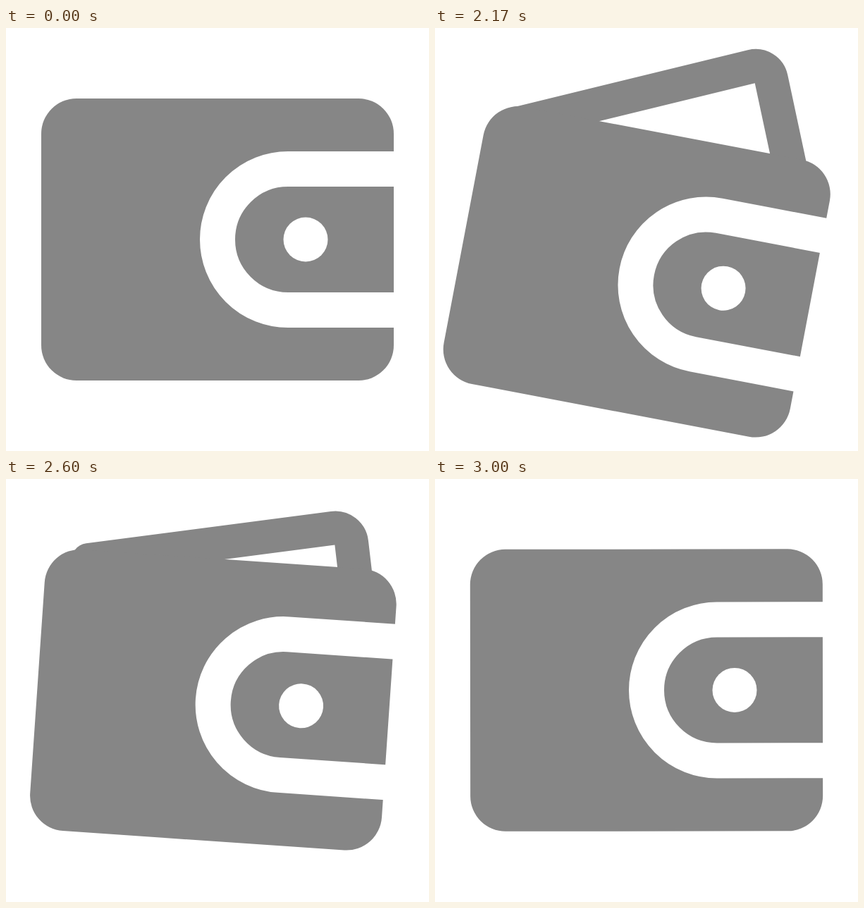
These frames come from a looping animation (600 px wide and 600 px high, 3.02 s). An HTML page:

```html
<!DOCTYPE html>
<html lang="en">
<head>
<meta charset="utf-8">
<title>Wallet</title>
<style>
  html, body { margin: 0; height: 100%; overflow: hidden; background: #fff; }
  svg { display: block; width: 100%; height: 100%; }
</style>
</head>
<body>
<svg viewBox="0 0 600 600">
  <g id="wallet">
    <path id="card" d="M-350 -24H0A24 24 0 0 1 24 0V150" fill="none"
          stroke="#868686" stroke-width="48" stroke-linecap="round"/>
    <rect x="50" y="100" width="500" height="400" rx="50" fill="#868686"/>
    <path d="M600 200H400a100 100 0 0 0 0 200H600" fill="none" stroke="#fff" stroke-width="50"/>
    <circle cx="425" cy="300" r="31.5" fill="#fff"/>
  </g>
</svg>
<script>
const LOOP = 3020, STEP = 25, OPEN = 2000, CLOSE = 2500, SETTLE = 2700;
const TILT = 13.2, FOLD = 30, RECOIL = -4.1;
const card = document.getElementById('card');
const wallet = document.getElementById('wallet');

const progress = (t, start, length) => Math.min(1, Math.max(0, (t - start) / length));
const mix = (a, b, p) => a + (b - a) * p;

function draw(now) {
  const t = Math.floor((now % LOOP + 5) / STEP) * STEP;
  const close = progress(t, CLOSE, SETTLE - CLOSE);
  const settle = progress(t, SETTLE, 305);

  // a quick swing, then a slow drift to fully open
  const open = 0.945 * progress(t, OPEN, 200) ** 1.1 + 0.055 * progress(t, OPEN + 200, 300);
  const recoil = close * (1 - settle);
  const turn = mix(mix(TILT * open, RECOIL, close ** 0.9), 0, settle);
  wallet.setAttribute('transform',
    `translate(${-4.2 * recoil} ${-7.5 * recoil}) rotate(${turn} 50 250)`);

  // the card swings against the wallet and slips left while closing
  const out = open * (1 - close) ** 1.4;
  const slip = Math.sin(Math.PI * close);
  card.setAttribute('transform',
    `translate(${-11 * slip} ${-9.5 * slip}) rotate(${-FOLD * out} 125 275) ` +
    `translate(500 150) skewX(${-2 * out})`);
}

const origin = performance.now();
function tick() {
  draw(performance.now() - origin);
  requestAnimationFrame(tick);
}
tick();
</script>
</body>
</html>
```
